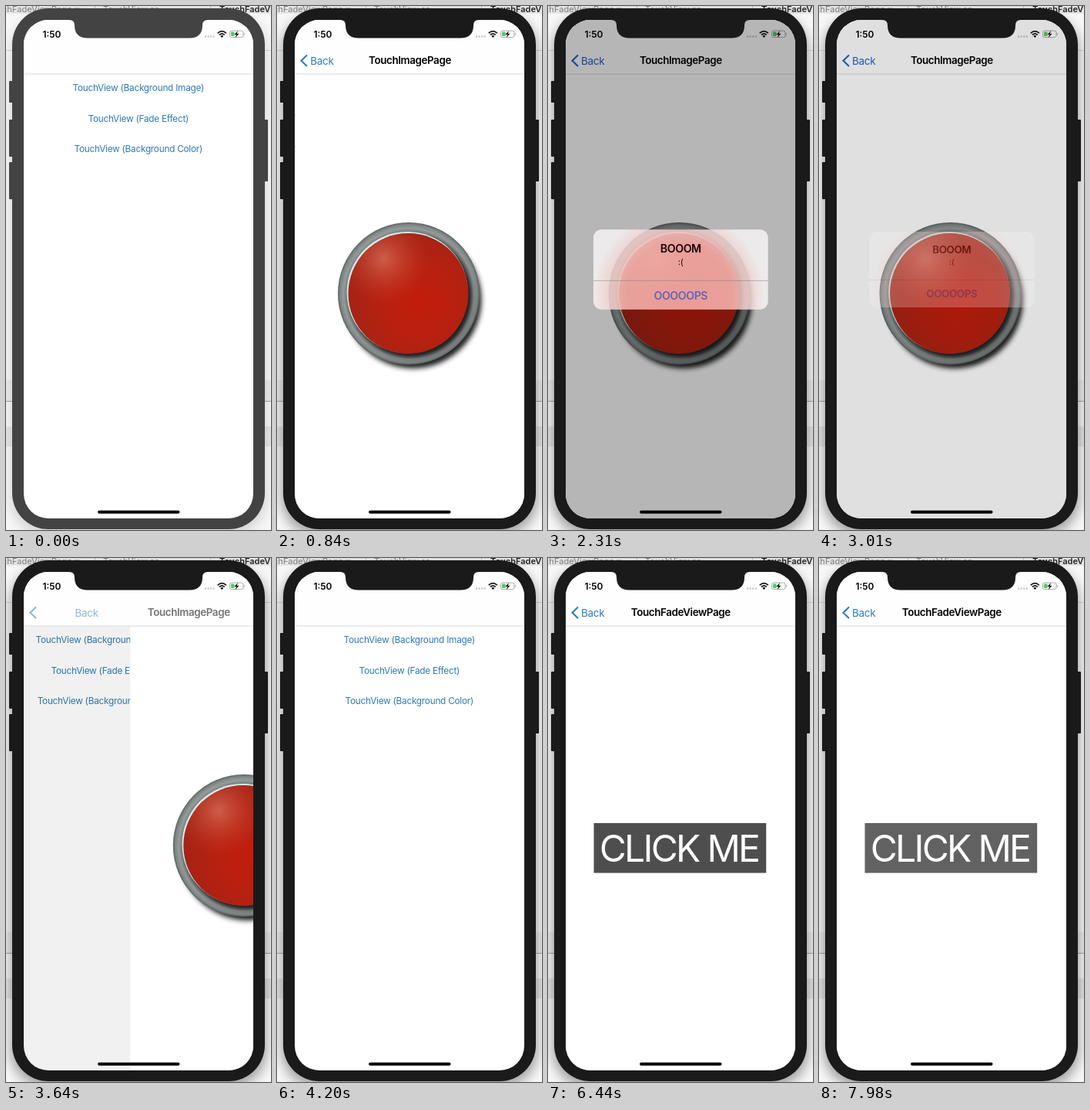
These frames come from a looping animation (344x678 px, 8 s). An HTML page:

```html
<!DOCTYPE html>
<html lang="en">
<head>
<meta charset="utf-8">
<title>Touch view demo</title>
<style>
html, body { margin: 0; width: 100%; height: 100%; overflow: hidden; background: #f6f6f6; }
svg { display: block; width: 344px; height: 678px; font-family: Inter, Roboto, sans-serif; }
.mid { text-anchor: middle; }
.link { font-size: 11.8px; letter-spacing: -.25px; fill: #2f7ab3; }
.bold { font-size: 13.4px; font-weight: 600; letter-spacing: -.4px; }
.tab { font-size: 11px; font-weight: 500; fill: #8a8a8a; }
</style>
</head>
<body>
<svg viewBox="0 0 344 678">
  <defs>
    <clipPath id="screen"><rect x="23" y="18" width="298" height="645" rx="32"/></clipPath>
    <clipPath id="face"><circle cx="170" cy="372" r="78"/></clipPath>
    <filter id="soft" x="-20%" y="-20%" width="140%" height="140%"><feGaussianBlur stdDeviation="3"/></filter>
    <filter id="wide" x="-20%" y="-20%" width="140%" height="140%"><feGaussianBlur stdDeviation="8"/></filter>
    <radialGradient id="ring" gradientUnits="userSpaceOnUse" cx="170.5" cy="372" r="92">
      <stop offset=".84" stop-color="#6b7272"/><stop offset=".92" stop-color="#949b9b"/>
      <stop offset=".97" stop-color="#7d8484"/><stop offset="1" stop-color="#5c6161"/>
    </radialGradient>
    <radialGradient id="red" gradientUnits="userSpaceOnUse" cx="184" cy="384" r="96">
      <stop offset="0" stop-color="#c41c0c"/><stop offset=".5" stop-color="#b82010"/>
      <stop offset="1" stop-color="#a32415"/>
    </radialGradient>
    <radialGradient id="shine" gradientUnits="userSpaceOnUse" cx="138" cy="327" r="58">
      <stop offset="0" stop-color="#d9725c" stop-opacity=".75"/><stop offset="1" stop-color="#c8402c" stop-opacity="0"/>
    </radialGradient>
    <radialGradient id="glass" gradientUnits="userSpaceOnUse" cx="170" cy="372" r="104">
      <stop offset="0" stop-color="#ffb8b4"/><stop offset=".62" stop-color="#ffbcb8"/>
      <stop offset=".78" stop-color="#fbd3d0"/><stop offset="1" stop-color="#f7f5f5"/>
    </radialGradient>
  </defs>

  <rect width="344" height="678" fill="#f7f7f7"/>
  <rect width="344" height="10" fill="#e6e6e6"/>
  <rect y="57" width="344" height="1" fill="#d4d4d4"/>
  <rect y="484" width="344" height="28" fill="#ececec"/>
  <rect y="511" width="344" height="1" fill="#a4a4a4"/>
  <rect y="544" width="344" height="26" fill="#e6e6e6"/>
  <path d="M115.5 0V9M265.5 0V9" stroke="#bbb"/>
  <text class="tab" x="-5" y="8">chFadeViewPage.x</text>
  <text class="tab" x="126" y="8">TouchView.cs</text>
  <text class="tab" x="277" y="8" style="fill:#222;font-weight:600">TouchFadeView</text>

  <rect id="shadow" x="6" y="12" width="332" height="672" rx="46" filter="url(#wide)"/>
  <g id="body">
    <path d="M4 98q0-1 1-1h5v28h-5q-1 0-1-1zM4 148q0-1 1-1h5v48h-5q-1 0-1-1zM4 203q0-1 1-1h5v48h-5q-1 0-1-1zM334 147h5q1 0 1 1v78q0 1-1 1h-5z"/>
    <rect x="8" y="3" width="328" height="674" rx="47"/>
  </g>

  <g clip-path="url(#screen)">
    <rect x="23" y="18" width="298" height="645" fill="#fff"/>
    <g id="list">
      <text class="link mid" x="171.8" y="109.5">TouchView (Background Image)</text>
      <text class="link mid" x="171.8" y="149.5">TouchView (Fade Effect)</text>
      <text class="link mid" x="171.8" y="189">TouchView (Background Color)</text>
    </g>
    <rect id="under" x="23" y="88" width="298" height="575"/>
    <g id="page">
      <rect x="23" y="88" width="298" height="575" fill="#fff"/>
      <g id="knob">
        <circle cx="176" cy="380" r="89" fill="#222" filter="url(#soft)"/>
        <circle cx="170.5" cy="372" r="92" fill="url(#ring)"/>
        <circle cx="173.5" cy="376" r="79" fill="#1c1c1c" filter="url(#soft)"/>
        <circle cx="168.8" cy="370.6" r="78.6" fill="#d9ebe8"/>
        <circle cx="170" cy="372" r="78" fill="url(#red)"/>
        <circle cx="138" cy="327" r="58" fill="url(#shine)" clip-path="url(#face)"/>
      </g>
      <g id="click">
        <rect x="59.5" y="343" width="223.7" height="64.5"/>
        <text class="mid" x="170" y="393" font-size="48" letter-spacing="-2.7" fill="#fff">CLICK ME</text>
      </g>
    </g>

    <rect x="23" y="18" width="298" height="70" fill="#fefefe"/>
    <rect x="23" y="87.5" width="298" height="1" fill="#dcdcdc"/>
    <path id="arrow" d="M39 63.5L31.5 70.8L39 78" fill="none" stroke-width="2.1"/>
    <text id="back" x="43" y="75.5" font-size="13.5" letter-spacing="-.3">Back</text>
    <text id="title" class="bold mid" x="172.3" y="75.3"></text>

    <text x="47.5" y="41" font-size="11.9" font-weight="600">1:50</text>
    <path d="M258 39.5h13" stroke="#bbb" stroke-width="2" stroke-dasharray="2 1.6"/>
    <g fill="none" stroke="#111" stroke-width="1.8">
      <path d="M274.8 35.2Q280.3 30 285.8 35.2M276.9 37.4Q280.3 34.3 283.7 37.4"/>
    </g>
    <path d="M278.3 38.8Q280.3 37.2 282.3 38.8L280.3 41z"/>
    <rect x="290.5" y="32" width="17.5" height="8.6" rx="2.4" fill="none" stroke="#aaa"/>
    <path d="M309.2 34.8v3" stroke="#aaa"/>
    <rect x="292" y="33.5" width="4.6" height="5.6" rx="1" fill="#56c768"/>
    <path d="M301 32l-4.6 5h2.6l-1.2 4 4.8-5.2h-2.8z" fill="#111"/>

    <rect id="dim" x="23" y="18" width="298" height="645"/>
    <g id="alert">
      <rect x="65" y="292" width="214.6" height="98" rx="10" fill="url(#glass)"/>
      <rect x="65" y="354.2" width="214.6" height=".8" fill="#b9a3a6"/>
      <text class="bold mid" x="172.3" y="320">BOOOM</text>
      <text class="mid" x="172.3" y="335.5" font-size="10.3">:(</text>
      <text class="bold mid" x="172.3" y="377.5" fill="#5f74dc">OOOOOPS</text>
    </g>
    <rect x="119" y="652.8" width="106.5" height="4" rx="2"/>
  </g>
  <path id="notch" d="M82 17v1q7 0 7 7q0 16.5 17 16.5H238q17 0 17-16.5q0-7 7-7v-1z"/>
</svg>
<script>
const LOOP = 8000, STEP = 70, WIDTH = 298;
const el = {};
document.querySelectorAll("svg [id]").forEach(n => el[n.id] = n);
const set = (n, attrs) => { for (const k in attrs) n.setAttribute(k, attrs[k]); };

// critically damped spring, 0 to 1, starting at `start` ms
const spring = (t, start, w = 17.4) => {
  const x = w * Math.max(0, t - start) / 1000;
  return 1 - (1 + x) * Math.exp(-x);
};
const ramp = (t, keys) => {
  let [t0, v0] = keys[0];
  for (const [t1, v1] of keys) {
    if (t < t1) return t <= t0 ? v0 : v0 + (v1 - v0) * (t - t0) / (t1 - t0);
    t0 = t1; v0 = v1;
  }
  return v0;
};
const fade = [[5425, 1], [5760, .6], [6090, 1], [6195, 1], [6510, .6], [6650, .6],
  [7000, 1], [7175, 1], [7525, .61], [8000, .61]];

function render(t) {
  const active = t >= 210;
  const shell = active ? "#1a1a1a" : "#434343";
  set(el.body, { fill: shell });
  set(el.notch, { fill: shell });
  set(el.shadow, { opacity: active ? .36 : .14 });

  const second = t >= 4500;
  const p = second ? spring(t, 4540) : spring(t, 335) * (1 - spring(t, 3550));
  const left = 1 - p;
  set(el.list, { transform: `translate(${-.3 * WIDTH * p})` });
  set(el.under, { opacity: .1 * p });
  set(el.page, { transform: `translate(${WIDTH * left})`, visibility: p > .0005 ? "visible" : "hidden" });
  set(el.knob, { display: second ? "none" : "inline" });
  set(el.click, { display: second ? "inline" : "none", opacity: ramp(t, fade) });

  el.title.textContent = second ? "TouchFadeViewPage" : "TouchImagePage";
  set(el.title, { transform: `translate(${140 * left})`, opacity: p });
  set(el.back, { transform: `translate(${100 * left})`, opacity: p });
  set(el.arrow, { opacity: p });

  const shown = spring(t, 2165), gone = 1 - spring(t, 2872);
  const tint = t >= 2200 && t < 3400 ? "#2264c6" : "#2f7cbf";
  set(el.back, { fill: tint });
  set(el.arrow, { stroke: tint });
  set(el.dim, { opacity: .4 * shown * gone });
  const k = 1 + .2 * (1 - shown);
  set(el.alert, {
    opacity: (1 - (1 - shown) ** 1.4) * gone,
    transform: `translate(172.3 340.8) scale(${k}) translate(-172.3 -340.8)`
  });
}

const begin = performance.now();
function tick() {
  const t = Math.max(0, performance.now() - begin) % LOOP;
  render(Math.floor(t / STEP) * STEP);
  requestAnimationFrame(tick);
}
tick();
</script>
</body>
</html>
```
